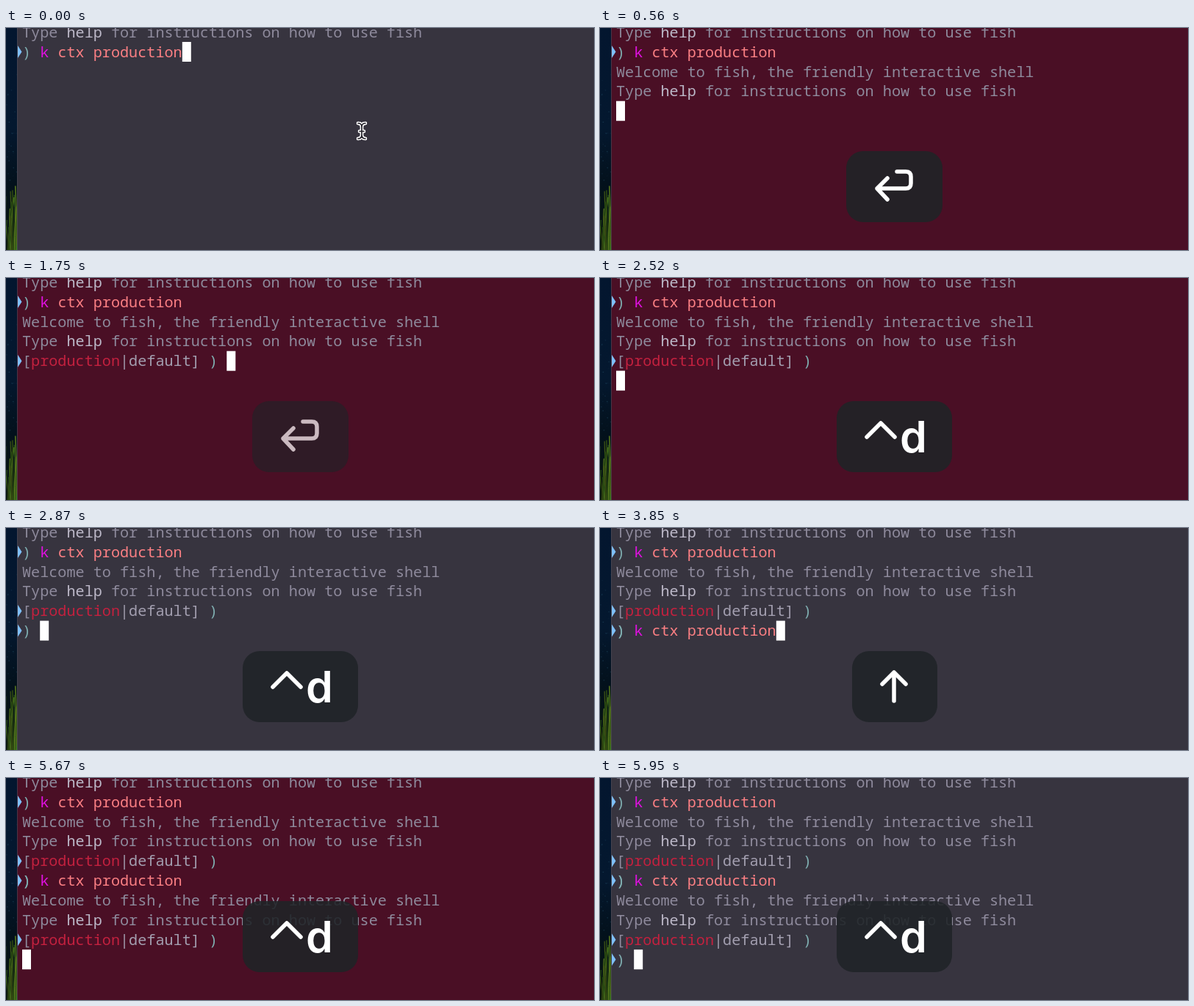
Animation, 800 px wide and 303 px high, one loop 6.02 s. Source, as an HTML page:

```html
<!DOCTYPE html>
<html lang="en">
<head>
<meta charset="utf-8">
<title>Shell context switch</title>
<style>
  html, body { margin: 0; width: 100%; height: 100%; overflow: hidden; background: #37343f; }
  svg { display: block; width: 100%; height: 100%; }
  text { white-space: pre; font: 20.17px "Noto Sans Mono", monospace; fill: #8e8a9c; }
  .hi { fill: #bcb8c8; }
  .cmd { fill: #fa7f83; }
  .k { fill: #e010e0; }
  .paren { fill: #7faeb0; }
  .prod { fill: #c3213f; }
  .ctx { fill: #a39fb0; }
  .icon { fill: none; stroke: #fff; stroke-width: 5.5; stroke-linecap: round; stroke-linejoin: round; }
  .key text { font: 600 59px Inter, sans-serif; fill: #fff; }
</style>
</head>
<body>
<svg viewBox="0 0 800 303" preserveAspectRatio="none">
  <defs>
    <linearGradient id="night" x2="0" y2="1">
      <stop stop-color="#03162f"/><stop offset=".45" stop-color="#04182f"/>
      <stop offset=".7" stop-color="#03111c"/><stop offset="1" stop-color="#08150b"/>
    </linearGradient>
    <clipPath id="edge"><path d="M0 0H15V303H0Z"/></clipPath>
  </defs>
  <rect id="bg" width="800" height="303"/>
  <g clip-path="url(#edge)">
    <rect width="15" height="303" fill="url(#night)"/>
    <g id="grass" fill="none"></g>
  </g>
  <path d="M15.5 0V303" stroke="#504d5b" opacity=".6"/>
  <g id="rows"></g>
  <rect id="cursor" width="12" height="27" fill="#fff"/>
  <g id="pointer" fill="none" stroke-linecap="round">
    <path id="beam" d="M479 130q5 0 5 5V146q0 5-5 5M489 130q-5 0-5 5M484 146q0 5 5 5M481 141h6" stroke="#fff" stroke-width="4.4"/>
    <use href="#beam"/>
    <path d="M479 130q5 0 5 5V146q0 5-5 5M489 130q-5 0-5 5M484 146q0 5 5 5M481 141h6" stroke="#25232b" stroke-width="1.7"/>
  </g>
  <g class="key" id="enter">
    <rect x="335" y="168" width="131" height="97" rx="23" fill="#1f2427" opacity=".88"/>
    <path class="icon" d="M404 196H416Q423 196 423 203V212Q423 219 416 219H377M391 205L377 219L391 234"/>
  </g>
  <g class="key" id="ctrlD">
    <rect x="322" y="168" width="157" height="97" rx="23" fill="#1f2427" opacity=".88"/>
    <path class="icon" d="M363 217L382 198L401 217"/>
    <text x="408" y="238">d</text>
  </g>
  <g class="key" id="up">
    <rect x="343" y="168" width="116" height="97" rx="23" fill="#1f2427" opacity=".88"/>
    <path class="icon" d="M400 236V197M384 213L400 197L416 213"/>
  </g>
</svg>
<script>
const LOOP = 6020, STEP = 70, CELL = 12.1, LINE = 26.9, LEFT = 22, TOP = 19;
const $ = id => document.getElementById(id);
const span = (cls, text) => `<tspan class="${cls}">${text}</tspan>`;

const welcome = 'Welcome to fish, the friendly interactive shell';
const help = `Type ${span('hi', 'help')} for instructions on how to use fish`;
const paren = span('paren', ')');
const command = `${paren} ${span('k', 'k')} ${span('cmd', 'ctx production')}`;
const prompt = `[${span('prod', 'production')}${span('ctx', '|default]')} ${paren}`;

// [row, start, content, has prompt marker]
const lines = [
  [-1, 0, help], [0, 0, command, true],
  [1, 490, welcome], [2, 490, help], [3, 630, prompt, true],
  [4, 2730, paren, true], [4, 3850, command],
  [5, 4270, welcome], [6, 4270, help], [7, 4410, prompt, true],
  [8, 5880, paren, true]
];
// [start, column, row]
const cursorStops = [
  [0, 18, 0], [280, 0, 1], [490, 0, 3], [630, 23, 3], [2310, 0, 4], [2730, 2, 4],
  [3850, 18, 4], [4060, 0, 5], [4270, 0, 7], [4410, 23, 7], [5460, 0, 8], [5880, 2, 8]
];
// [start, key]
const keyStops = [[0, ''], [280, 'enter'], [2310, 'ctrlD'], [3850, 'up'], [4060, 'enter'], [5460, 'ctrlD']];

$('rows').innerHTML = lines.map(([row, , content, marker]) => {
  const y = TOP + row * LINE;
  const arrow = marker ? `<path d="M16 ${y + 5}L21.5 ${y + 13.5}L16 ${y + 22}Z" fill="#7fc0fb"/>` : '';
  return `<g>${arrow}<text x="${LEFT}" y="${y + 20.6}">${content}</text></g>`;
}).join('');
const rowNodes = [...$('rows').children];

let seed = 7;
const random = () => (seed = seed * 16807 % 2147483647) / 2147483647;
let blades = '';
for (let i = 0; i < 26; i++) {
  const x = random() * 18 - 2, y = 212 + random() * 65, lean = random() * 12 - 6;
  blades += `<path d="M${x} 305Q${x} ${y + 35} ${x + lean} ${y}" stroke="hsl(${70 + random() * 35} 60% ${14 + random() * 20}%)" stroke-width="${0.8 + random()}"/>`;
}
for (let i = 0; i < 30; i++) {
  blades += `<path d="M${random() * 15} ${60 + random() * 150}h1.5" stroke="#24506a" opacity="${random() * 0.6}"/>`;
}
$('grass').innerHTML = blades;

const latest = (stops, t) => stops.findLast(stop => stop[0] <= t);
const within = (t, from, to) => t >= from && t < to;

function draw(now) {
  const t = Math.floor(now % LOOP / STEP) * STEP;
  const production = within(t, 420, 2660) || within(t, 4200, 5810);
  $('bg').setAttribute('fill', production ? '#4a0f25' : '#37343f');
  lines.forEach(([, start], i) => rowNodes[i].style.display = t >= start ? '' : 'none');

  const [, column, row] = latest(cursorStops, t);
  $('cursor').setAttribute('x', LEFT + column * CELL);
  $('cursor').setAttribute('y', TOP + row * LINE);
  $('pointer').style.display = t < 280 ? '' : 'none';

  const key = latest(keyStops, t)[1];
  const fade = t < 2310 ? Math.max(0, Math.min(1, (2100 - t) / 490)) : 1;
  for (const id of ['enter', 'ctrlD', 'up']) $(id).style.opacity = id === key ? fade : 0;
  requestAnimationFrame(draw);
}
draw(0);
</script>
</body>
</html>
```
